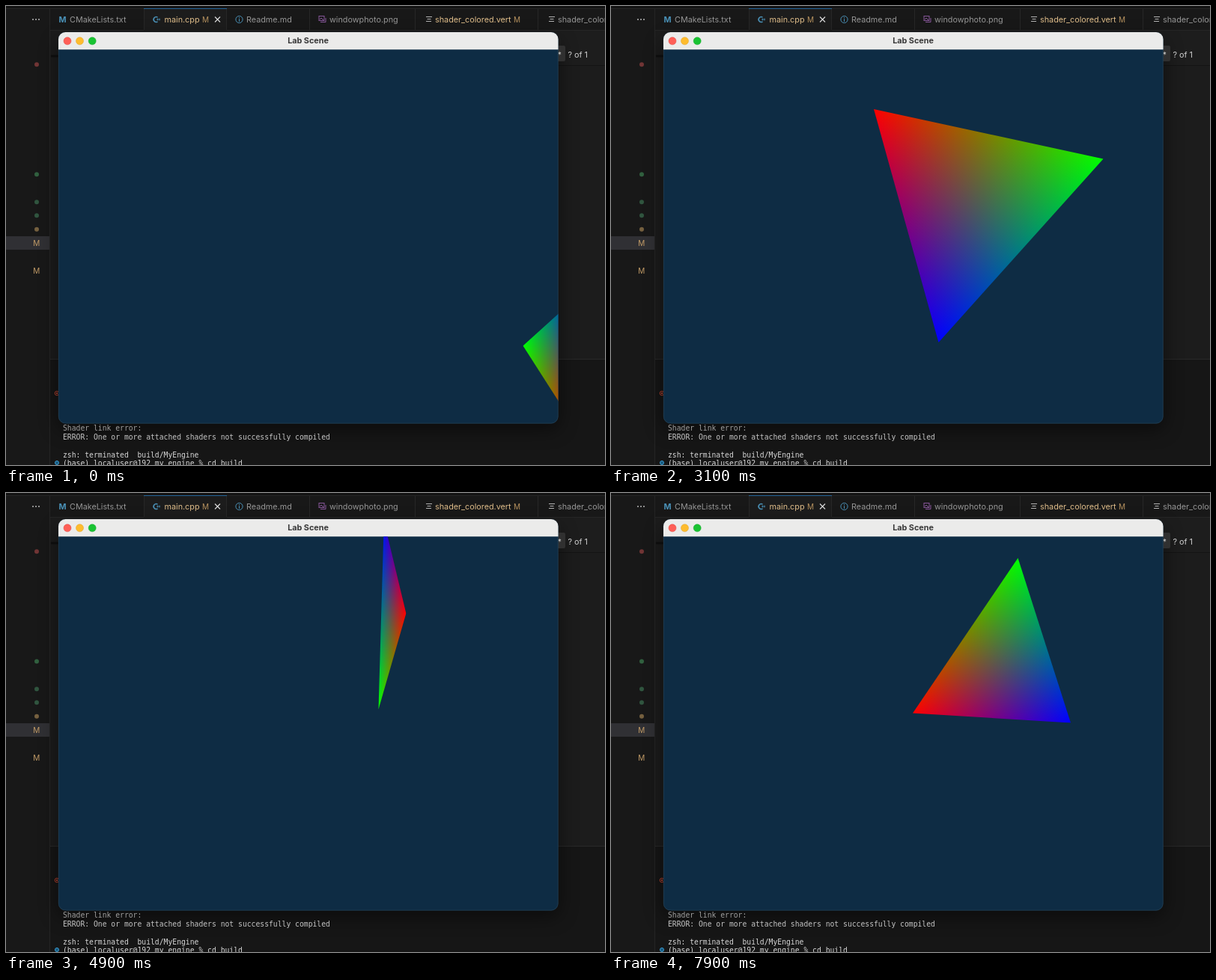
Recreate the animation shown at these times as an HTML page. Size 800 by 614 pixels, loop 8 s.

```html
<!DOCTYPE html>
<html lang="en">
<head>
<meta charset="utf-8">
<title>Lab Scene</title>
<style>
  html, body { margin: 0; width: 100%; height: 100%; overflow: hidden; background: #181818; }
  svg { display: block; width: 100vw; height: 100vh; }
  text { font: 10.8px Inter, "Open Sans", sans-serif; white-space: pre; }
  .mono text { font: 9.72px "DejaVu Sans Mono", "Liberation Mono", monospace; }
  .bold { font-weight: 700; }
  .mesh { isolation: isolate; }
  .mesh rect { mix-blend-mode: screen; }
</style>
</head>
<body>
<svg viewBox="0 0 800 614" preserveAspectRatio="none">
  <defs>
    <clipPath id="view"><path d="M70 58.300H737.500V549a9.500 9.500 0 0 1-9.500 9.500H79.500a9.500 9.500 0 0 1-9.500-9.500Z"/></clipPath>
    <clipPath id="outline"><polygon id="triangle"/></clipPath>
    <filter id="blur" x="-20%" y="-20%" width="140%" height="140%"><feGaussianBlur stdDeviation="13"/></filter>
    <g id="lines" fill="none" stroke="#b5b5b5"><path d="M0 .5H8M1.500 3.500H6.500M0 6.500H7"/></g>
  </defs>

  <rect width="800" height="614" fill="#181818"/>
  <rect x="59" y="32" width="741" height="440" fill="#1c1c1c"/>
  <rect x="59" y="473" width="741" height="141" fill="#161616"/>
  <path d="M59 472.500H800" stroke="#292929"/>
  <rect width="800" height="3" fill="#131313"/>
  <path d="M0 3.500H800" stroke="#262626"/>
  <path d="M58.500 4V614" stroke="#252525"/>

  <!-- sidebar -->
  <rect y="308" width="58" height="18" fill="#303034"/>
  <g fill="#b5b5b5"><circle cx="36" cy="18" r="1"/><circle cx="40" cy="18" r="1"/><circle cx="44" cy="18" r="1"/></g>
  <g id="marks"></g>

  <!-- editor tabs -->
  <rect x="184" y="4" width="111" height="29" fill="#1c1c1c"/>
  <path d="M59 32.500H184M295 32.500H800" stroke="#252525"/>
  <path d="M184.500 4V32M294.500 4V32M405.500 4V32M546.500 4V32M710.500 4V32" stroke="#272727"/>
  <path d="M184 3.500H295" stroke="#24659a"/>
  <text x="70.500" y="22" class="bold" fill="#4a91b7">M</text>
  <path d="M202.500 15.200A3.400 3.400 0 1 0 202.500 20.800" fill="none" stroke="#4a91b7" stroke-width="1.600"/>
  <path d="M201 18H206M202.500 16.500V19.500M205 16.500V19.500" stroke="#4a91b7" stroke-width=".8"/>
  <path d="M279 14.500L286 21.500M286 14.500L279 21.500" stroke="#d8d8d8" stroke-width="1.200"/>
  <g fill="none" stroke="#4a91b7"><circle cx="311.500" cy="18" r="4.600"/><path d="M311.500 15V16.200M311.500 17.200V21"/></g>
  <g fill="none" stroke="#87569a"><rect x="418" y="13.500" width="7" height="6"/><path d="M420 21.500H427V16M419 18L421 16L424 19"/></g>
  <use href="#lines" x="561" y="14"/>
  <use href="#lines" x="725" y="14"/>
  <g id="tabs"></g>

  <!-- find bar -->
  <rect x="690" y="33" width="110" height="46" fill="#1d1d1d"/>
  <path d="M690 79.500H800" stroke="#141414"/>
  <path d="M60 67H75" stroke="#101010" stroke-width="3"/>

  <!-- terminal gutter -->
  <circle cx="68" cy="518" r="2.800" fill="none" stroke="#b5412f"/>
  <path d="M67 517L69 519M69 517L67 519" stroke="#b5412f"/>
  <circle cx="68" cy="611" r="2.500" fill="#16587d" stroke="#3b9bd0"/>

  <rect x="70" y="46" width="668" height="520" rx="10" fill="#000" opacity=".5" filter="url(#blur)"/>
  <rect x="730" y="53" width="17" height="21" rx="2" fill="#303030"/>
  <text x="736.500" y="69" fill="#d0d0d0">*</text>
  <text x="750.500" y="69" fill="#cfcfcf">? of 1</text>
  <g class="mono" id="terminal"></g>

  <!-- app window -->
  <rect x="70" y="35" width="667.500" height="523.500" rx="9.500" fill="#0e2c44"/>
  <rect x="70.300" y="35.300" width="666.900" height="522.900" rx="9.200" fill="none" stroke="#2c475c" stroke-width=".6"/>
  <path d="M70 58.300V44.500a9.500 9.500 0 0 1 9.500-9.500H728a9.500 9.500 0 0 1 9.500 9.500V58.300Z" fill="#ebebea"/>
  <g stroke-width=".5">
    <circle cx="82" cy="46.800" r="5" fill="#fe5f57" stroke="#e0443e"/>
    <circle cx="98.500" cy="46.800" r="5" fill="#febc2e" stroke="#dea123"/>
    <circle cx="115.200" cy="46.800" r="5" fill="#19c332" stroke="#14a92a"/>
  </g>
  <text x="403.500" y="50.300" text-anchor="middle" class="bold" fill="#383838">Lab Scene</text>
  <g clip-path="url(#view)">
    <g transform="translate(.5 .5)">
      <g class="mesh" id="mesh" clip-path="url(#outline)"></g>
    </g>
  </g>
</svg>

<script>
const $ = id => document.getElementById(id);

function add(parent, tag, attrs, text) {
  const el = document.createElementNS('http://www.w3.org/2000/svg', tag);
  for (const k in attrs) el.setAttribute(k, attrs[k]);
  if (text) el.textContent = text;
  parent.appendChild(el);
  return el;
}

const GOLD = '#dfbd8a', GREY = '#969696';
for (const [x, label, fill] of [
  [85, 'CMakeLists.txt', GREY], [211.5, 'main.cpp', GOLD], [321, 'Readme.md', GREY],
  [432, 'windowphoto.png', GREY], [573, 'shader_colored.vert', GOLD], [737, 'shader_colored.frag', GREY]
]) add($('tabs'), 'text', { x, y: 22, fill }, label);
for (const x of [262, 678])
  add($('tabs'), 'text', { x, y: 22, fill: '#b8935f', style: 'font-size:10px' }, 'M');

for (const [cy, fill] of [[78, '#713535'], [225, '#31603f'], [262, '#30553f'], [280, '#30553f'], [298.5, '#75603f']])
  add($('marks'), 'circle', { cx: 41, cy: cy + .3, r: 3, fill });
for (const y of [321.3, 358])
  add($('marks'), 'text', { x: 36.3, y, fill: '#c39c67', style: 'font-size:10px' }, 'M');

for (const [y, line, fill] of [
  [568, 'Shader link error:', '#a0a0a0'],
  [580, 'ERROR: One or more attached shaders not successfully compiled', '#c4c4c4'],
  [603.5, 'zsh: terminated  build/MyEngine', '#d8d8d8'],
  [614.8, '(base) localuser@192 my_engine % cd build', '#d8d8d8']
]) add($('terminal'), 'text', { x: 76, y, fill }, line);

// Poses: time in s, then the red, green and blue corners
const LOOP = 8000, STEP = 100;
const SPIN_START = 83, SPIN_RATE = -284;
const POSES = [
  [0, 759, 562, 690, 454, 767.5, 384],
  [1.4, 547, 462, 510, 320, 650, 373],
  [2.2, 616, 270.5, 503, 454.5, 356.5, 261.5],
  [3.1, 350.5, 137.5, 657, 204, 437, 449.5],
  [4.2, 324, 173, 491, 52, 498, 261],
  [5.8, 607, 19, 542, 223.5, 664, 315],
  [7.9, 402.5, 294, 543, 86.5, 613.5, 307]
];

const spin = t => (SPIN_START + SPIN_RATE * t) * Math.PI / 180;

// Centre and plane axes with the steady spin removed, so they change slowly
function unspin([t, rx, ry, gx, gy, bx, by]) {
  const c = Math.cos(spin(t)), s = Math.sin(spin(t));
  const ux = bx - rx, uy = by - ry;
  const vx = gx - (rx + bx) / 2, vy = gy - (ry + by) / 2;
  return [(rx + gx + bx) / 3, (ry + gy + by) / 3,
    ux * c - vx * s, uy * c - vy * s, ux * s + vx * c, uy * s + vy * c];
}

const times = POSES.map(p => p[0]);
const states = POSES.map(unspin);

function slope(i, k) {
  const a = Math.max(i - 1, 0), b = Math.min(i + 1, times.length - 1);
  return (states[b][k] - states[a][k]) / (times[b] - times[a]);
}

function stateAt(t) {
  let i = 0;
  while (i < times.length - 2 && t >= times[i + 1]) i++;
  const h = times[i + 1] - times[i];
  const p = Math.min((t - times[i]) / h, 1), q = 1 - p;
  return states[i].map((a, k) =>
    a * (1 + 2 * p) * q * q + states[i + 1][k] * (3 - 2 * p) * p * p +
    h * p * q * (slope(i, k) * q - slope(i + 1, k) * p));
}

function cornersAt(t) {
  const [x, y, ax, ay, bx, by] = stateAt(t);
  const c = Math.cos(spin(t)), s = Math.sin(spin(t));
  const place = (u, v) => {
    const m = u * c - v * s, n = u * s + v * c;
    return [x + ax * m + bx * n, y + ay * m + by * n];
  };
  return [place(-.5, -1 / 3), place(0, 2 / 3), place(.5, -1 / 3)];
}

// One additive layer per corner colour, fading to black at the opposite edge
const fades = ['#f00', '#0f0', '#00f'].map((color, i) => {
  const fade = add($('mesh'), 'linearGradient', { id: 'fade' + i, gradientUnits: 'userSpaceOnUse' });
  add(fade, 'stop', { offset: 0, 'stop-color': '#000' });
  add(fade, 'stop', { offset: 1, 'stop-color': color });
  add($('mesh'), 'rect', { width: 800, height: 614, fill: `url(#fade${i})` });
  return fade;
});

function foot([px, py], [ax, ay], [bx, by]) {
  const dx = bx - ax, dy = by - ay;
  const k = ((px - ax) * dx + (py - ay) * dy) / (dx * dx + dy * dy);
  return [ax + k * dx, ay + k * dy];
}

function draw(ms) {
  const corners = cornersAt(Math.floor(ms % LOOP / STEP) * STEP / 1000);
  $('triangle').setAttribute('points', corners.map(p => p.map(n => n.toFixed(2))).join(' '));
  fades.forEach((fade, i) => {
    const tip = corners[i];
    const base = foot(tip, corners[(i + 1) % 3], corners[(i + 2) % 3]);
    const ends = { x1: base[0], y1: base[1], x2: tip[0], y2: tip[1] };
    for (const k in ends) fade.setAttribute(k, ends[k].toFixed(2));
  });
}

const start = performance.now();
function tick() {
  draw(performance.now() - start);
  requestAnimationFrame(tick);
}
tick();
</script>
</body>
</html>
```
